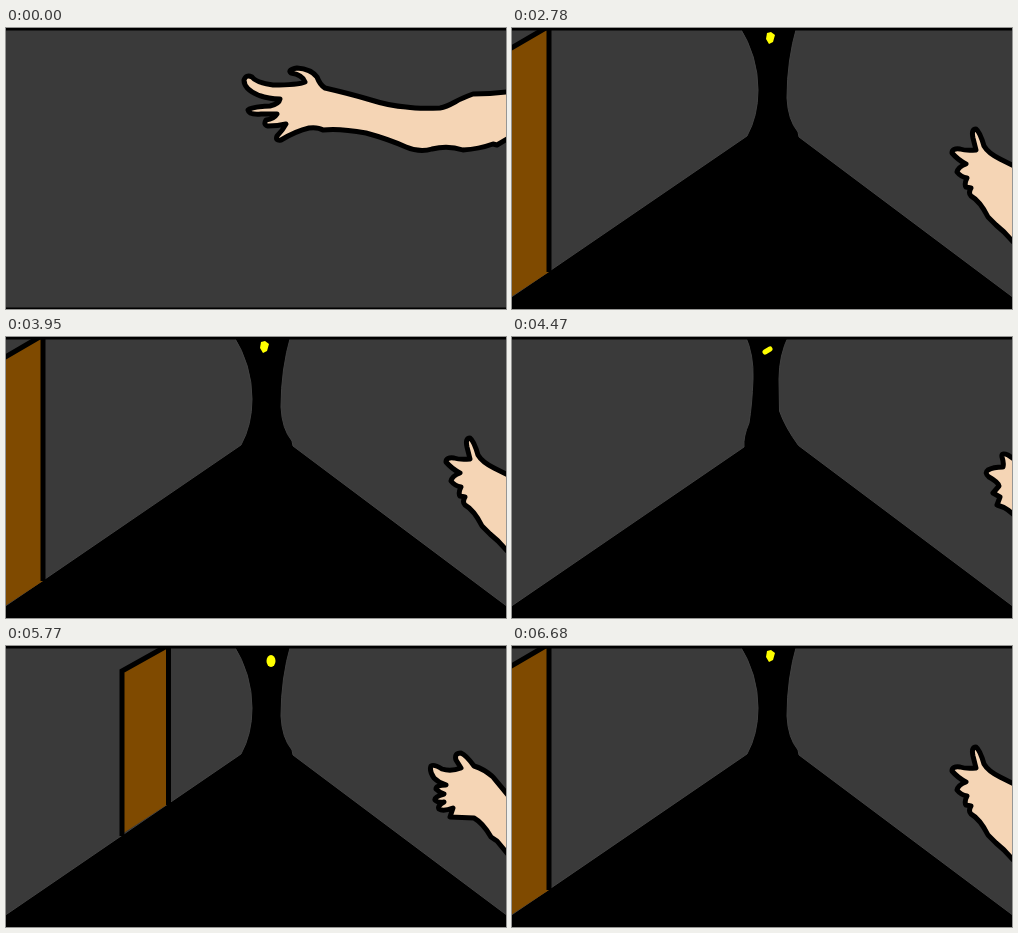
Animation, 500 px wide and 281 px high, one loop 8680 ms. Source, as an HTML page without scripts:

```html
<!DOCTYPE html>
<html lang="en">
<head>
<meta charset="utf-8">
<title>Dark corridor</title>
<style>
  html, body { margin: 0; height: 100%; overflow: hidden; background: #000; }
  #stage { display: block; width: 100vw; height: 100vh; }
  .wall { fill: #3a3a3a; stroke: #424242; }
  .door { fill: #7f4a00; }
  .skin { fill: #f5d5b5; }
  .skin, .frame { stroke: #000; stroke-width: 5; stroke-linejoin: round; stroke-linecap: round; }
  .frame { fill: none; stroke-linecap: butt; stroke-linejoin: miter; }
  .glow { fill: #ff0; }
  .slit { stroke: #ff0; stroke-width: 5; stroke-linecap: round; }

  /* The cells lie side by side: hold the first, run 35 steps, hold the last. */
  #film { animation: film 8680ms infinite; }
  @keyframes film {
    0% { transform: translateX(0); animation-timing-function: step-end; }
    24.539% { transform: translateX(-500px); animation-timing-function: steps(35, end); }
    76.958%, 100% { transform: translateX(-18000px); }
  }
</style>
</head>
<body>
<svg id="stage" viewBox="0 0 500 281">
  <defs>
    <symbol id="reach" viewBox="0 0 500 281">
      <rect class="wall" x="-2" y="-2" width="504" height="285"/>
      <path class="skin" d="M506 63Q488 66 467 66Q456 70 449 74Q440 79 434 80Q412 81 400 79
        Q384 78 365 72Q345 66 319 60Q314 57 311 49Q305 41 291 40Q281 42 285 45Q297 47 299 54
        Q292 57 267 57Q251 55 246 49Q240 46 238 52Q238 61 252 67Q262 71 274 71Q273 76 264 78
        Q245 79 242 82Q243 87 255 86L271 86Q268 91 260 92Q257 97 262 98Q272 98 280 96
        Q277 102 271 108Q269 113 275 112Q290 103 303 100Q312 99 317 102Q333 100 360 105
        Q382 111 400 119Q414 125 426 121Q442 117 457 122Q473 121 487 116L491 117L506 108"/>
    </symbol>

    <symbol id="far" viewBox="0 0 500 281">
      <path class="wall" d="M-2 -2H233Q242 18 241 42Q240 68 237 86Q231 100 232 110L-2 270Z
        M502 -2H277Q267 18 267 42L267.500 74Q273 90 286.500 108.500L502 270Z"/>
      <path class="skin" d="M506 125L496 118Q489 115 490 120Q492 126 491 130Q481 130 476 133
        Q472 136 477 140Q486 145 487 149L481 156L488 160L485 168Q492 170 496 173L506 181"/>
    </symbol>

    <path id="walls" class="wall" d="M-2 -2H227Q246 28 246 62Q246 88 235 108L-2 270Z
      M502 -2H285Q275 32 275 70Q276 92 286 104L287 109L502 270Z"/>

    <symbol id="mid" viewBox="0 0 500 281">
      <use href="#walls"/>
      <path class="door" d="M116 25L162 -1V158L116 188Z"/>
      <path class="frame" d="M116 190V25L162.500 -1V159"/>
      <path class="skin" d="M506 154L487 131Q478 123 468 120Q460 109 455 107Q448 107 450 114
        L455 122Q445 126 436 123Q428 118 425 120Q423 125 428 132Q433 137 440 139Q430 139 430 143
        Q434 147 438 148Q428 151 429 154Q432 157 438 156Q431 160 433 163Q437 166 447 162L444 171
        L468 172Q477 177 485 191L491 195L506 213"/>
      <ellipse class="glow" cx="265" cy="15" rx="4.500" ry="6"/>
    </symbol>

    <symbol id="near" viewBox="0 0 500 281">
      <use href="#walls"/>
      <path class="door" d="M-4 22L37 -2V244L-4 271Z"/>
      <path class="frame" d="M-4 22L37 -2V244"/>
      <path class="skin" d="M506 140L488 131Q476 125 472 118Q468 104 464 101Q459 101 461 110
        L464 122Q454 123 448 121Q440 120 440 125Q446 132 454 136Q446 139 445 144Q449 149 455 150
        Q452 156 454 159L459 160Q456 165 459 168Q468 173 476 189L484 197L492 204L506 219"/>
      <path class="glow" d="M255 5L259 4L263 7L261 14L257 16L254 11Z"/>
    </symbol>

    <g id="stride">
      <use href="#far" width="500" height="281"/>
      <use href="#mid" x="500" width="500" height="281"/>
      <use href="#near" x="1000" width="500" height="281"/>
    </g>
    <g id="walk">
      <use href="#stride"/>
      <use href="#stride" x="1500"/>
      <use href="#stride" x="3000"/>
      <path class="slit" d="M253 15L258 12M1755 14.500L1760 11.500M3258 13.500L3262 11"/>
    </g>
  </defs>

  <g id="film">
    <use href="#reach" width="500" height="281"/>
    <use href="#walk" x="500"/>
    <use href="#walk" x="5000"/>
    <use href="#walk" x="9500"/>
    <use href="#walk" x="14000"/>
  </g>
  <path d="M0 0H500V2.500H0ZM0 279.500H500V281H0Z"/>
</svg>
</body>
</html>
```
